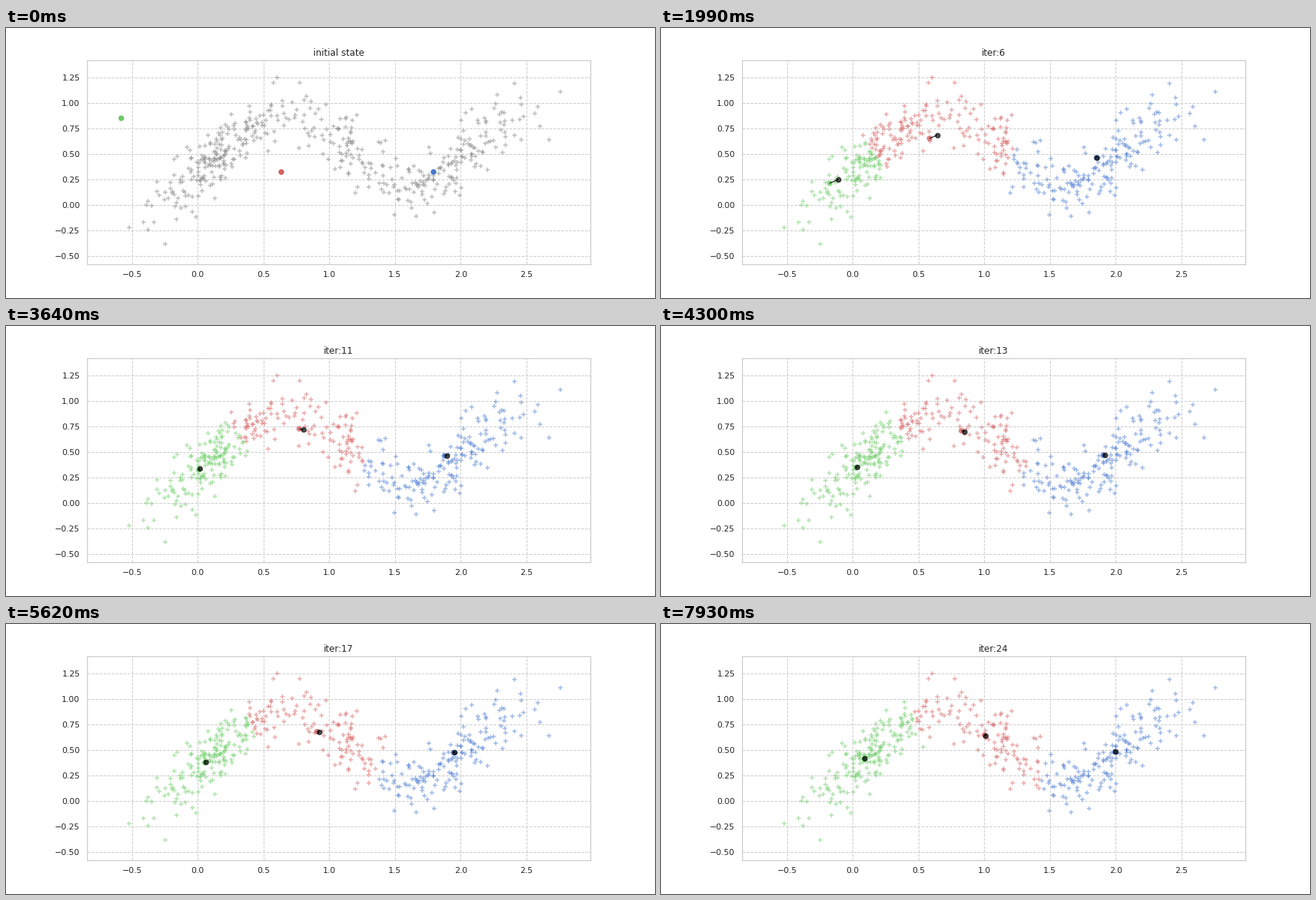
A matplotlib script for the animation above (8 s loop, 864 by 360 pixels).

```python
import numpy as np
import matplotlib.pyplot as plt
from matplotlib.animation import FuncAnimation
from matplotlib.colors import to_rgba

STEP_MS, LOOP_MS = 20, 8000
HOLD_MS, ITER_MS = 1330, 330
FIRST_ITER = 4
COLORS = ["#6acc64", "#d65f5f", "#4878d0"]

plt.rcParams.update({
    "font.family": "DejaVu Sans",
    "text.color": ".15", "xtick.color": ".15", "ytick.color": ".15",
    "axes.edgecolor": ".8", "axes.linewidth": 1.25, "axes.axisbelow": True,
    "axes.titlesize": 12, "axes.titlepad": 6,
    "xtick.labelsize": 11, "ytick.labelsize": 11,
    "grid.color": ".8", "grid.linestyle": "--", "grid.linewidth": 1,
})

# Green, red and blue centres: at the start, then at a few iterations
START = np.array([(-.583, .85), (.635, .3225), (1.793, .3235)])
KEY_ITERS = [4, 9, 24]
KEYS = np.array([
    [(-.285, .15), (.4865, .599), (1.85, .467)],
    [(-.005, .3125), (.738, .739), (1.861, .46)],
    [(.089, .416), (1.012, .643), (1.998, .482)],
])


def make_points(seed=7):
    """Three groups along a noisy sine wave that drops off on the left."""
    rng = np.random.default_rng(seed)
    groups = [(.18, .28, 200), (1.15, .30, 120), (2.02, .29, 145)]
    x = np.concatenate([rng.normal(*g) for g in groups])
    y = .55 + .35 * np.sin(3.33 * (x - .2)) - .9 * np.maximum(0, -.1 - x)
    return x, y + rng.normal(0, .16, x.size)


def centers(n):
    """Centres slow down so that they move evenly in log time."""
    if n < FIRST_ITER:
        return START
    when = np.log(np.array(KEY_ITERS) - 3)
    flat = [np.interp(np.log(n - 3), when, k) for k in KEYS.reshape(3, -1).T]
    return np.reshape(flat, (3, 2))


points = np.column_stack(make_points())
gray = to_rgba("gray", .5)
tints = np.array([to_rgba(c, .5) for c in COLORS])

fig, ax = plt.subplots(figsize=(12, 5), dpi=72, facecolor="white")
fig.subplots_adjust(left=.125, right=.9, bottom=.125, top=.88)
ax.set(xlim=(-.8427, 2.9845), ylim=(-.581, 1.4172),
       xticks=np.arange(-.5, 2.6, .5), yticks=np.arange(-.5, 1.3, .25))
ax.grid(True)
ax.tick_params(length=0, pad=9.5)
title = ax.set_title("initial state")

dot = dict(s=36, linewidths=1.5)
cloud = ax.scatter(*points.T, marker="+", color=gray, **dot)
old_dots = ax.scatter(*START.T, c=COLORS, **dot)
new_dots = ax.scatter(*START.T, c="black", alpha=.65, **dot)
links = [ax.plot([], [], color="black", lw=1)[0] for _ in COLORS]


def draw(i):
    n = FIRST_ITER + (i * STEP_MS + STEP_MS // 2 - HOLD_MS) // ITER_MS
    running = n >= FIRST_ITER
    old, new = centers(n - 1), centers(n)

    title.set_text(f"iter:{n}" if running else "initial state")
    old_dots.set_offsets(old)
    old_dots.set_alpha(.7 if running else 1)
    new_dots.set_offsets(new)
    new_dots.set_visible(running)
    for link, a, b in zip(links, old, new):
        link.set_data([a[0], b[0]], [a[1], b[1]])
        link.set_visible(running)

    nearest = ((points[:, None] - old) ** 2).sum(axis=2).argmin(axis=1)
    cloud.set_color(tints[nearest] if running else gray)
    return [title, cloud, old_dots, new_dots, *links]


anim = FuncAnimation(fig, draw, frames=LOOP_MS // STEP_MS, interval=STEP_MS,
                     repeat=True, repeat_delay=0)
plt.show()
```
